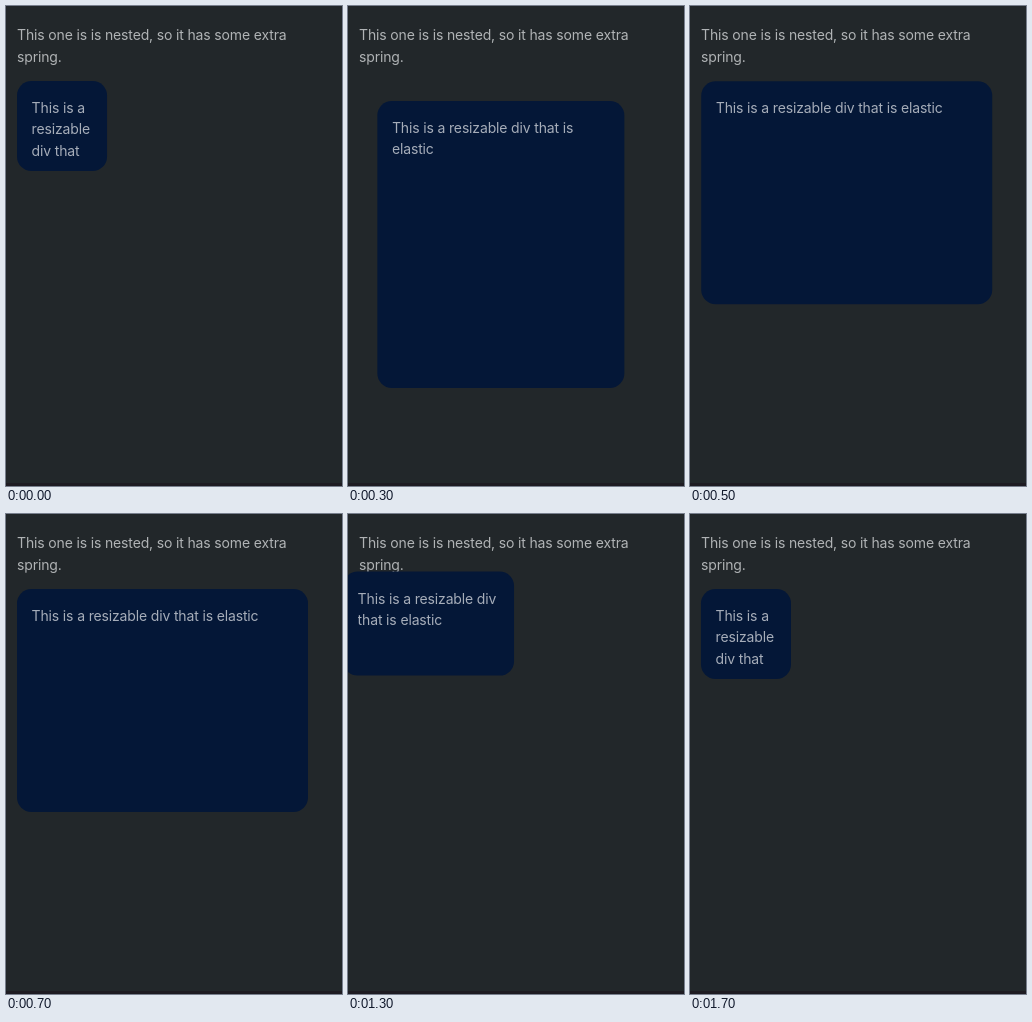
Recreate the animation shown at these times as an HTML page. Size 336x480 px, loop 1900 ms.

```html
<!DOCTYPE html>
<html lang="en">
<head>
<meta charset="utf-8">
<title>Elastic resizable div</title>
<style>
  html, body { margin: 0; width: 100%; height: 100%; overflow: hidden; background: #22272a; }
  body {
    position: relative;
    font: 14px/21.6px Inter, sans-serif;
    letter-spacing: -.15px;
    color: #b0b3b5;
  }
  p { position: absolute; left: 11px; top: 18.4px; margin: 0; white-space: nowrap; }
  #box {
    position: absolute; left: 11.2px; top: 75.2px;
    box-sizing: border-box;
    padding: 15.4px 15px 14.4px 14.4px;
    border-radius: 14.4px;
    background: #041737;
    color: #a6adb9;
  }
  #label { height: 100%; overflow: hidden; }
  footer { position: absolute; left: 0; right: 0; bottom: 0; height: 3px; background: #1e1b22; }
</style>
</head>
<body>
<p>This one is is nested, so it has some extra<br>spring.</p>
<div id="box"><div id="label">This is a resizable div that is elastic</div></div>
<footer></footer>
<script>
const LOOP = 1900, STEP = 100, SHRINK_AT = 1200;
const SMALL = 90, WIDE = 291, TALL = 223;
const box = document.getElementById('box');

const mix = (a, b, k) => a + (b - a) * Math.min(1, Math.max(0, k));
const bell = t => Math.exp(-((t / 109) ** 2));

// Rise to a peak, then settle within one step
const overshoot = (t, peakAt, peak, rest) => t < peakAt
  ? mix(SMALL, peak, t / peakAt)
  : mix(peak, rest, (t - peakAt) / STEP);

function pose(t) {
  if (t <= SHRINK_AT) return {
    w: overshoot(t, 400, 299, WIDE),
    h: overshoot(t, 300, 287, TALL),
    sway: 19.8 * bell(t - 270)
  };
  const left = Math.max(0, 1 - (t - SHRINK_AT) / 272);
  return {
    w: mix(SMALL, WIDE, left ** 2),
    h: mix(SMALL, TALL, left ** 5),
    sway: -16.5 * bell(t - 1320)
  };
}

function draw(now) {
  const t = Math.floor(now % LOOP / STEP) * STEP;
  const { w, h, sway } = pose(t);
  box.style.width = w + 'px';
  box.style.height = h + 'px';
  box.style.transform = `translate(${sway}px, ${sway * 1.09}px)`;
}

const start = performance.now();
function tick() {
  draw(performance.now() - start);
  requestAnimationFrame(tick);
}
tick();
</script>
</body>
</html>
```
